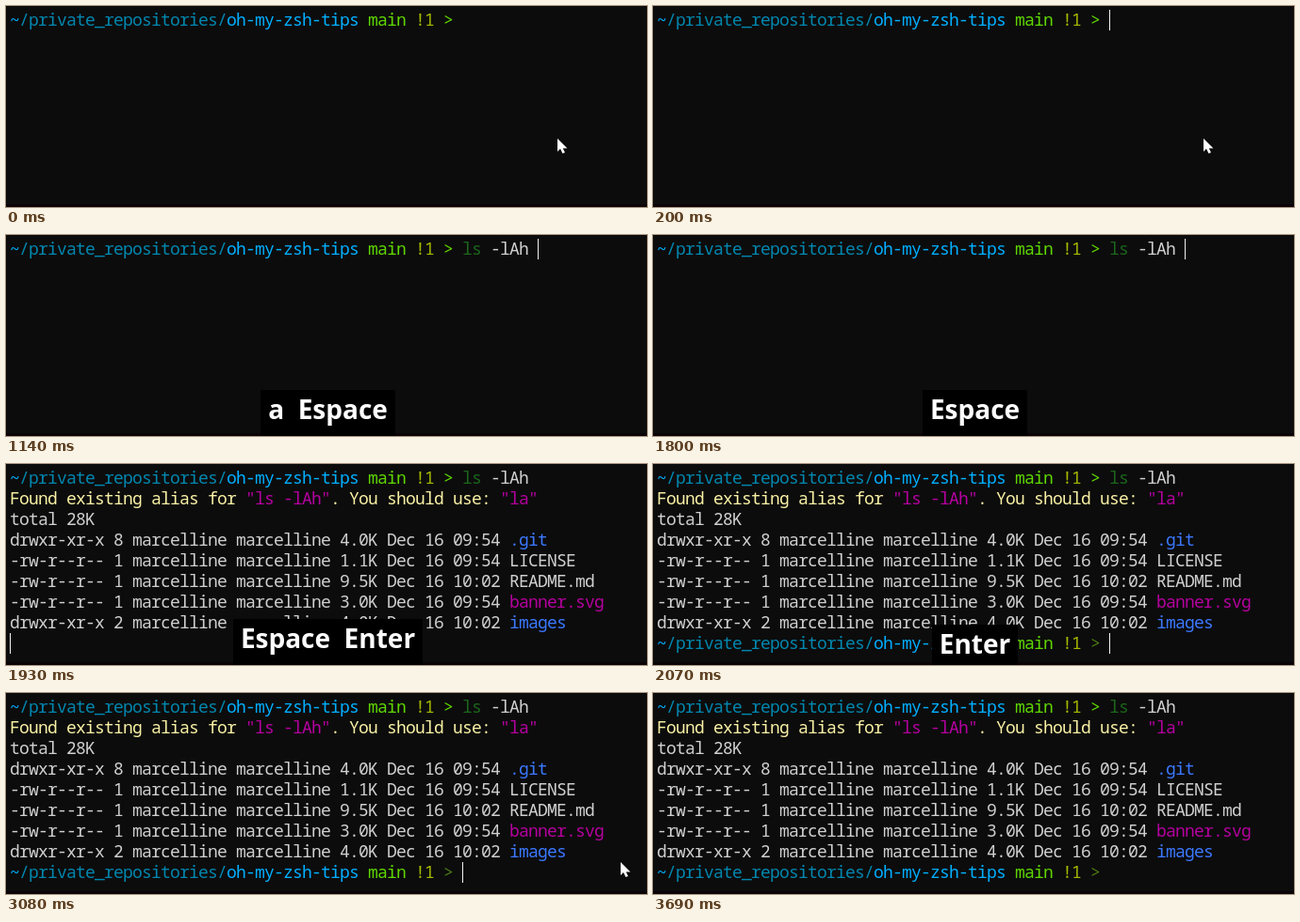
Write an HTML page that moves like this. It is 680 px wide and 214 px high and loops after 3.82 s.

```html
<!DOCTYPE html>
<html lang="en">
<head>
<meta charset="utf-8">
<style>
html, body { margin: 0; width: 680px; height: 214px; overflow: hidden; background: #0c0c0c; }
body { position: relative; }
#edge { position: absolute; top: 211px; width: 680px; height: 3px; background: #0a0307; }
#term {
  position: absolute; left: 4px; top: 3px; margin: 0; color: #d0d0d0;
  font: 18px/22px "Noto Sans Mono", "DejaVu Sans Mono", monospace;
  letter-spacing: -.8px; font-variant-ligatures: none;
}
b { font-weight: 500; }
.path { color: #0087af; }
.dir { color: #00afff; }
.ok { color: #5fd700; }
.mod { color: #a5b800; }
.dim { color: #4d7c12; }
.cmd { color: #1c661c; }
.note { color: #f9f1a5; }
.pink { color: #b4009e; }
.blue { color: #3b78ff; }
#caret { position: absolute; left: 0; top: 0; width: 1px; height: 22px; background: #f2f2f2; }
#bar { position: absolute; left: 0; width: 683px; bottom: 0; display: flex; justify-content: center; }
#keys {
  padding: 0 8px; background: #000; color: #fff; white-space: pre;
  font: bold 28px/40px "Noto Sans", "Open Sans", sans-serif;
}
svg { position: absolute; left: 0; top: 0; }
</style>
</head>
<body>
<div id="edge"></div>
<pre id="term"></pre>
<div id="caret"></div>
<div id="bar"><div id="keys"></div></div>
<svg width="680" height="214"><path id="mouse" d="M0 0V14L3 11L5.5 16L8 15L5.8 10.5H10.5Z" fill="#fff" stroke="#000" paint-order="stroke"/></svg>
<script>
const LOOP = 3820, STEP = 70;
const el = id => document.getElementById(id);
const paint = (cls, text) => `<span class="${cls}">${text}</span>`;
const bold = (cls, text) => `<b class="${cls}">${text}</b>`;

const prompt = arrow => bold('dir', '~') + paint('path', '/private_repositories/') +
  bold('dir', 'oh-my-zsh-tips') + ' ' + paint('ok', 'main') + ' ' + paint('mod', '!1') +
  ' ' + bold(arrow, '&gt;') + ' ';

const user = 'marcelline';
const entry = (mode, links, size, time, name) =>
  `${mode} ${links} ${user} ${user} ${size} Dec 16 ${time} ${name}`;
const DIR = 'drwxr-xr-x', FILE = '-rw-r--r--';
const listing = [
  bold('note', 'Found existing alias for ') + paint('pink', '"ls -lAh"') +
    bold('note', '. You should use: ') + paint('pink', '"la"'),
  'total 28K',
  entry(DIR, 8, '4.0K', '09:54', paint('blue', '.git')),
  entry(FILE, 1, '1.1K', '09:54', 'LICENSE'),
  entry(FILE, 1, '9.5K', '10:02', 'README.md'),
  entry(FILE, 1, '3.0K', '09:54', paint('pink', 'banner.svg')),
  entry(DIR, 2, '4.0K', '10:02', paint('blue', 'images'))
];

// Last value whose start time has passed
const at = (t, track) => track.filter(([start]) => start <= t).pop()[1];

const typed = [[0, ''], [730, paint('cmd', 'l')], [800, paint('cmd', 'la')],
  [1140, paint('cmd', 'ls') + ' -lAh ']];
const pressed = [[0, ''], [730, 'l'], [870, 'a'], [1140, 'a  Espace'], [1800, 'Espace'],
  [1930, 'Espace  Enter'], [2070, 'Enter'], [2940, '']];
// Caret column and row
const carets = [[0, null], [200, [48, 0]], [730, [49, 0]], [800, [50, 0]], [1140, [56, 0]],
  [1930, [0, 8]], [2000, [48, 8]], [3690, null]];
const sweep = [[595, 133], [611, 120], [630, 131], [645, 155], [652, 180], [651, 195]];
const pointer = [[0, [585, 141]], [140, [584, 141]], [730, null],
  ...sweep.map((p, i) => [2800 + i * STEP, p]), [3370, null]];

function screen(t) {
  const lines = [prompt('ok') + at(t, typed)];
  if (t >= 1930) lines.push(...listing);
  if (t >= 2000) lines.push(prompt('dim'));
  return lines.join('\n');
}

function place(node, pos, x, y) {
  node.style.display = pos ? '' : 'none';
  if (pos) node.style.transform = `translate(${x(pos)}px, ${y(pos)}px)`;
}

let shown;
function draw(t) {
  const html = screen(t);
  if (html !== shown) el('term').innerHTML = shown = html;

  const keys = at(t, pressed);
  el('bar').style.display = keys ? '' : 'none';
  el('keys').textContent = keys;
  el('keys').style.height = (keys.includes('p') ? 49 : 43) + 'px';

  place(el('caret'), at(t, carets), p => 4 + p[0] * 10, p => 4 + p[1] * 22);
  place(el('mouse'), at(t, pointer), p => p[0], p => p[1]);
}

const begin = performance.now();
function frame() {
  draw((performance.now() - begin) % LOOP);
  requestAnimationFrame(frame);
}
frame();
</script>
</body>
</html>
```
